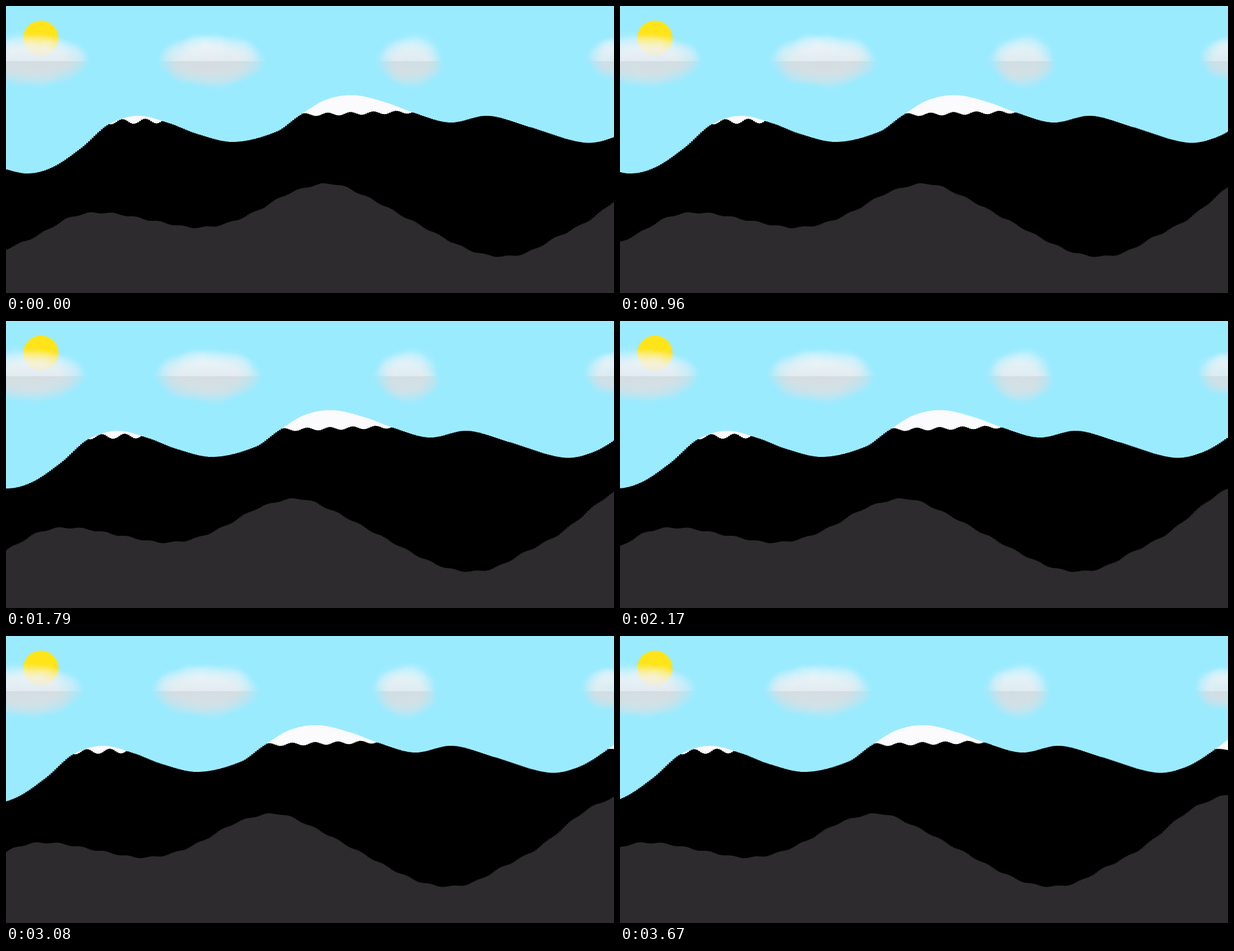
Animation, 1000 px wide and 473 px high, one loop 3710 ms. Source, as an HTML page:

```html
<!DOCTYPE html>
<html lang="en">
<head>
<meta charset="utf-8">
<title>Mountain parallax</title>
<style>
  html, body { margin: 0; width: 100%; height: 100%; overflow: hidden; background: #9bebff; }
  svg { display: block; width: 100vw; height: 100vh; }
</style>
</head>
<body>
<svg viewBox="0 0 1000 473" preserveAspectRatio="none">
  <defs>
    <radialGradient id="puff">
      <stop offset="0" stop-color="#fff"/>
      <stop offset=".5" stop-color="#fff" stop-opacity=".85"/>
      <stop offset=".75" stop-color="#fff" stop-opacity=".4"/>
      <stop offset="1" stop-color="#fff" stop-opacity="0"/>
    </radialGradient>
    <!-- clouds are lit above y = 91 and shaded below it -->
    <linearGradient id="shade" gradientUnits="userSpaceOnUse" x1="0" y1="40" x2="0" y2="140">
      <stop offset="0" stop-color="#fbfdff"/>
      <stop offset=".505" stop-color="#ecebee"/>
      <stop offset=".51" stop-color="#dcdbde"/>
      <stop offset="1" stop-color="#dae3e7"/>
    </linearGradient>
    <mask id="clouds" maskUnits="userSpaceOnUse" x="0" y="20" width="1000" height="140">
      <g id="puffs"></g>
    </mask>
  </defs>
  <rect width="1000" height="473" fill="#9bebff"/>
  <circle cx="57.5" cy="53" r="29" fill="#ffe41a"/>
  <rect y="20" width="1000" height="140" fill="url(#shade)" mask="url(#clouds)"/>
  <g id="back">
    <path id="snow" fill="#fbfafc"/>
    <path id="ridge" fill="#000"/>
  </g>
  <path id="hills" fill="#2e2b2e"/>
</svg>
<script>
const LOOP = 3710, END = 1110;
const BACK_SPEED = 0.79, FRONT_SPEED = 1.21, CLOUD_SPEED = 0.13;   // px per tick
const $ = id => document.getElementById(id);

// Peaks, valleys and the bends between them
const crestKeys = [
  [-30, 258], [0, 269], [38, 276], [78, 265], [125, 233], [169, 195], [217, 181], [268, 193],
  [315, 211], [375, 224], [445, 207], [482, 181], [525, 155], [572, 147], [625, 159], [671, 176],
  [730, 192], [793, 181], [860, 199], [950, 225], [1000, 216], [1048, 187], [1120, 130]
];
const hillKeys = [
  [-30, 413], [0, 401], [50, 379], [110, 347], [165, 341], [248, 355], [310, 365], [360, 359],
  [408, 340], [470, 307], [535, 293], [590, 313], [662, 351], [755, 399], [803, 412], [852, 408],
  [900, 384], [965, 349], [1041, 289], [1090, 266], [1130, 257]
];
const caps = [
  { from: 169, to: 269, left: 195, right: 193, lift: 4, sway: 4 },
  { from: 481, to: 671, left: 181, right: 176, lift: 1.5, sway: 2.5 },
  { from: 1048, to: END, left: 187, right: 187, lift: 0, sway: 1 }
];
const clouds = [
  { x: 45, y: 90, w: 98, h: 46, alpha: .85 },
  { x: 338, y: 90, w: 96, h: 46, alpha: .85 },
  { x: 666, y: 91, w: 53, h: 44, alpha: .72 },
  { x: 1004, y: 86, w: 48, h: 36, alpha: .65 }
];

const wave = (x, top, period) => Math.cos((x - top) / period * 2 * Math.PI);

// Cubic interpolation through key points
function curve(keys) {
  const at = i => keys[Math.max(0, Math.min(keys.length - 1, i))];
  const slope = i => (at(i + 1)[1] - at(i - 1)[1]) / (at(i + 1)[0] - at(i - 1)[0]);
  return x => {
    let i = 0;
    while (i < keys.length - 2 && x > at(i + 1)[0]) i++;
    const [x0, y0] = at(i), [x1, y1] = at(i + 1);
    const w = x1 - x0, t = (x - x0) / w, s = 1 - t;
    return s * s * ((1 + 2 * t) * y0 + t * w * slope(i))
      + t * t * ((3 - 2 * t) * y1 - s * w * slope(i + 1));
  };
}

const crest = curve(crestKeys);
const hillBase = curve(hillKeys);
const hill = x => hillBase(x) + 1.2 * wave(x, 195, 38.2);

// Rock starts at the crest, or below the wavy lower edge of a snow cap
function rock(x) {
  const c = caps.find(c => x > c.from && x < c.to);
  if (!c) return crest(x);
  const chord = c.left + (c.right - c.left) * (x - c.from) / (c.to - c.from);
  return Math.max(crest(x), chord - c.lift - c.sway * wave(x, 604, 37.5));
}

// Terrain is built from narrow columns, which gives steep slopes their steps
function terrain(f, step = 3) {
  let d = 'M-9 480';
  for (let x = -9; x < END; x += step) d += `V${f(x + step / 2).toFixed(1)}H${x + step}`;
  return d + 'V480Z';
}

function snowCap({ from, to }) {
  let d = `M${from} 200`;
  for (let x = from; x <= to; x++) d += `L${x} ${crest(x).toFixed(1)}`;
  return d + `L${to} 200Z`;
}

$('ridge').setAttribute('d', terrain(rock));
$('hills').setAttribute('d', terrain(hill));
$('snow').setAttribute('d', caps.map(snowCap).join(''));

let seed = 7;
const random = () => (seed = seed * 16807 % 2147483647) / 2147483647;

function addPuff(cx, cy, rx, ry, alpha) {
  const e = document.createElementNS('http://www.w3.org/2000/svg', 'ellipse');
  Object.entries({ cx, cy, rx, ry, opacity: alpha, fill: 'url(#puff)' })
    .forEach(([k, v]) => e.setAttribute(k, v));
  $('puffs').appendChild(e);
  return e;
}

// Each cloud is a dense core with a ring of faint puffs that slowly swell and thin
const ring = clouds.flatMap(({ x, y, w, h, alpha }) => {
  addPuff(x, y, w * .95, h * .95, alpha);
  addPuff(x, y, w * .8, h * .85, alpha * .4);
  return Array.from({ length: 11 }, (_, i) => {
    const a = (i + random() * .6) / 11 * 2 * Math.PI;
    const size = h * (.55 + random() * .2);
    const density = alpha * (.25 + random() * .2);
    const el = addPuff(x + Math.cos(a) * w * .62, y + Math.sin(a) * h * .52, size, size * .85, density);
    return { el, density, phase: random() * 6.28 };
  });
});

const shift = (id, dx) => $(id).setAttribute('transform', `translate(${-dx.toFixed(2)} 0)`);

// 24 ticks per second, with tick times rounded to 10 ms
const tickAt = ms => Math.ceil((Math.floor(ms / 10) + .5) * 6 / 25) - 1;

function draw(ms) {
  const n = tickAt(ms % LOOP);
  shift('back', n * BACK_SPEED);
  shift('hills', n * FRONT_SPEED);
  shift('puffs', n * CLOUD_SPEED);
  for (const { el, density, phase } of ring) {
    el.setAttribute('opacity', (density * (1 + .25 * Math.sin(n * .03 + phase))).toFixed(3));
  }
}

const start = performance.now();
function loop(now) {
  draw(Math.max(0, now - start));
  requestAnimationFrame(loop);
}
draw(0);
requestAnimationFrame(loop);
</script>
</body>
</html>
```
